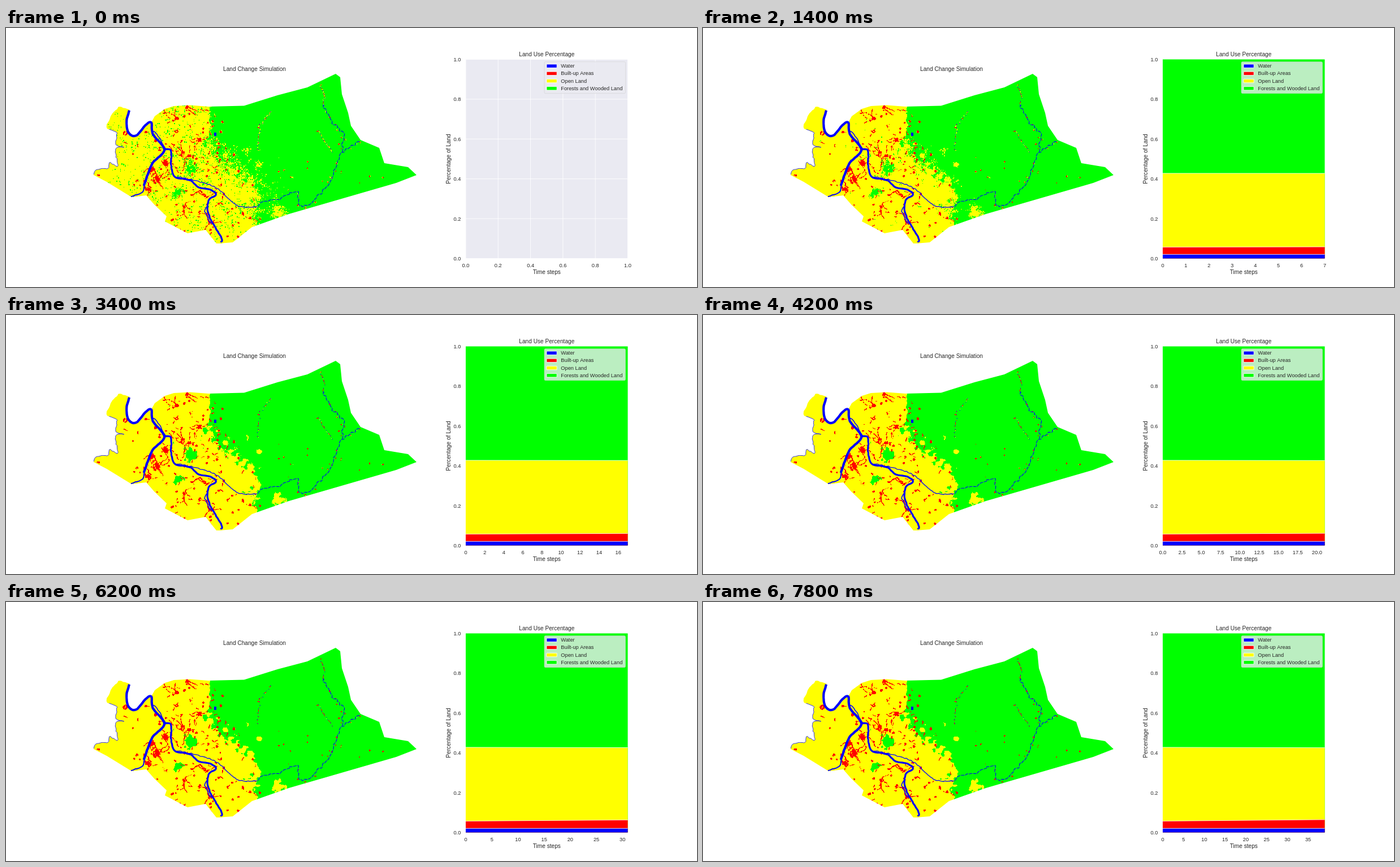
Recreate the animation shown at these times as an HTML page with a canvas. Size 1222 by 458 pixels, loop 8000 ms.

```html
<!DOCTYPE html>
<html lang="en">
<head>
<meta charset="utf-8">
<title>Land Change Simulation</title>
<style>
html, body { margin: 0; width: 100%; height: 100%; overflow: hidden; background: #fff; }
canvas { display: block; }
</style>
</head>
<body>
<canvas id="stage" width="1222" height="458"></canvas>
<script>
const STEP_MS = 200, STEPS = 40;
const WATER = '#0000ff', BUILT = '#ff0000', OPEN = '#ffff00', FOREST = '#00ff00';
const INK = '#262626', FONT = '"Liberation Sans", Arial, sans-serif';
const ctx = document.getElementById('stage').getContext('2d');

// ---------- helpers ----------
function hash(x, y, seed) {
  let h = Math.imul(x, 374761393) ^ Math.imul(y, 668265263) ^ Math.imul(seed, 1442695041);
  h = Math.imul(h ^ (h >>> 13), 1274126177);
  h = Math.imul(h ^ (h >>> 15), 2246822519);
  return ((h ^ (h >>> 16)) >>> 0) / 4294967296;
}
let draws = 0;
const rand = (a, b) => a + (b - a) * hash(draws++, 11, 5);
const clamp = (v, a, b) => Math.min(b, Math.max(a, v));
const ease = t => t * t * (3 - 2 * t);
const rise = (v, from, to) => ease(clamp((v - from) / (to - from), 0, 1));

// Value noise in -1..1
function noise(x, y, size, seed) {
  x /= size; y /= size;
  const i = Math.floor(x), j = Math.floor(y), u = ease(x - i), v = ease(y - j);
  const top = hash(i, j, seed) * (1 - u) + hash(i + 1, j, seed) * u;
  const low = hash(i, j + 1, seed) * (1 - u) + hash(i + 1, j + 1, seed) * u;
  return (top * (1 - v) + low * v) * 2 - 1;
}

// Smooth curve through key points, with a natural wobble
function trace(keys, wobble = 0) {
  const out = [], last = keys.length / 2 - 1;
  const key = (i, axis) => keys[2 * clamp(i, 0, last) + axis];
  const spline = (i, t, axis) => {
    const a = key(i - 1, axis), b = key(i, axis), c = key(i + 1, axis), d = key(i + 2, axis);
    return b + t * (c - a + t * (2 * a - 5 * b + 4 * c - d + t * (3 * (b - c) + d - a))) / 2;
  };
  for (let i = 0; i < last; i++) {
    const n = Math.ceil(Math.hypot(key(i + 1, 0) - key(i, 0), key(i + 1, 1) - key(i, 1)) / 2);
    for (let k = 0; k < n; k++) {
      const x = spline(i, k / n, 0), y = spline(i, k / n, 1);
      out.push(x + wobble * noise(x, y, 4, 7), y + wobble * noise(x, y, 4, 8));
    }
  }
  out.push(key(last, 0), key(last, 1));
  return out;
}
function path(points, p = new Path2D()) {
  for (let i = 0; i < points.length; i += 2) p.lineTo(points[i], points[i + 1]);
  return p;
}

// ---------- map geometry ----------
const X0 = 150, Y0 = 75, W = 580, H = 310;

const EAST = [257,167, 263,156, 281,143, 297,138, 325,136.5, 358,139, 421,137.5, 480,119, 533,105,
  583,81, 591,87, 594,117, 605,150, 610,173, 627,198, 660,212, 669,239, 711,246, 726,260,
  690,274, 500,329, 435,352, 401,379, 377,381];
const SOUTHWEST = [372,381, 353,357, 321,363, 281,342, 284,333, 262,312, 248,296, 222,299, 178,272, 155,260];
const COAST = trace([155,259, 160,250, 181,248, 184,238, 198,245, 196,232, 195,212, 208,211,
  194,206, 196,185, 178,177, 180,166, 191,147, 203,140, 219,146], 1.5);
const BANK = trace([219,146, 215,168, 218,183, 229,189, 247,171, 257,167]);
const outline = path([...EAST, ...SOUTHWEST, ...COAST, ...BANK]);

const RIVERS = [
  [4.2, .4, 218,146, 213,165, 217,186, 230,190, 247,172, 257,167, 260,188, 280,215, 260,238, 251,258, 244,279],
  [3.2, .6, 280,215, 292,217, 292,245, 300,264, 325,269, 341,282, 362,286, 371,295, 358,306, 359,332, 381,371, 380,379],
  [2, .8, 244,279, 242,290, 221,298],
  [1.5, .8, 259,182, 267,188, 284,216],
  [1.5, 1, 358,313, 352,324, 362,346],
  [1.3, 1.2, 300,263, 340,271, 374,284, 409,314, 440,316]
].map(([width, wobble, ...keys]) => ({ width, line: path(trace(keys, wobble)) }));

const STREAMS = [
  [440,316, 465,305, 484,303, 493,296, 505,291, 516,292, 520,315, 540,309, 558,289, 575,272, 583,247, 594,220, 626,201],
  [594,220, 596,186, 575,165, 560,136]
].map(keys => trace(keys, 2.6));
const BROOKS = [
  [560,136, 564,124, 557,100],
  [552,180, 560,195, 578,220],
  [468,149, 450,172, 444,215]
].map(keys => trace(keys, 3));

// x, y, radius
const TOWNS = [
  [211,186,6], [321,142,7], [302,160,5], [281,239,9], [258,251,9], [266,267,10], [252,285,9],
  [311,222,7], [343,198,6], [324,226,5], [354,298,6], [316,315,5], [361,345,5], [163,261,4]
];
// x, y, radius, weight: positive is wooded, negative is open
const PATCHES = [
  [290,162,7,1.2], [303,290,10,1.5], [325,248,13,1], [455,337,13,1.6],
  [425,215,8,-1.2], [447,240,7,-1.5], [428,290,14,-1], [482,326,14,-1.6]
];
const forestEdge = y => 360 + 75 * rise(y, 190, 290) + 1.3 * Math.max(0, y - 318);

// ---------- fixed fields ----------
function layer() {
  const c = document.createElement('canvas');
  c.width = W; c.height = H;
  const g = c.getContext('2d', { willReadFrequently: true });
  g.translate(-X0, -Y0);
  return g;
}
function blob(g, x, y, r) {
  const fill = g.createRadialGradient(x, y, 0, x, y, r);
  fill.addColorStop(0, '#000');
  fill.addColorStop(.5, 'rgba(0,0,0,.8)');
  fill.addColorStop(1, 'rgba(0,0,0,0)');
  g.fillStyle = fill;
  g.fillRect(x - r, y - r, 2 * r, 2 * r);
}
function road(g, x, y, length) {
  const points = [x, y];
  let angle = rand(0, 6.28);
  for (let d = 0; d < length; d += 2) {
    angle += rand(-.6, .6);
    points.push(x += 2 * Math.cos(angle), y += 2 * Math.sin(angle));
  }
  g.stroke(path(points));
}
function builtField() {
  const g = layer();
  g.lineWidth = 1.4;
  for (const [x, y, r] of TOWNS) {
    blob(g, x, y, r);
    if (x > 250) for (let i = 0; i < 4; i++) road(g, x, y, rand(10, 34));
  }
  for (let i = 0; i < 260; i++) {
    const x = rand(195, 450), y = rand(138, 372), r = rand(1.4, 3.6);
    if (x > forestEdge(y) + 25 || rand(0, 1) > rise(x, 190, 290)) continue;
    if (r < 2.5) road(g, x, y, 3 * r);
    else blob(g, x, y, r);
  }
  g.strokeStyle = 'rgba(0,0,0,.55)';
  g.lineWidth = 1.2;
  BROOKS.forEach(b => g.stroke(path(b)));
  for (const s of [...STREAMS, ...BROOKS])
    for (let i = 0; i < s.length; i += 2)
      if (rand(0, 1) < .1) blob(g, s[i] + rand(-5, 5), s[i + 1] + rand(-5, 5), rand(1, 2.3));
  for (let i = 0; i < 14; i++) blob(g, rand(470, 670), rand(225, 275), rand(1, 2.2));
  return g.getImageData(0, 0, W, H).data;
}
const built = builtField();
const wood = new Float32Array(W * H), speck = new Float32Array(W * H);
const town = new Float32Array(W * H), fringe = new Float32Array(W * H);

for (let j = 0; j < H; j++) {
  const y = j + Y0, edge = forestEdge(y), width = 3 + 40 * rise(y, 183, 215);
  for (let i = 0; i < W; i++) {
    const k = j * W + i, x = i + X0, alpha = built[k * 4 + 3] / 255;
    let v = clamp((x - edge) / width, -1, 2.4) - .12 * rise(270 - x, 0, 40);
    v += .35 * Math.exp(-(((x - 335) / 50) ** 2) - ((y - 235) / 50) ** 2);
    for (const [px, py, r, weight] of PATCHES)
      v += weight * Math.exp(-((x - px) ** 2 + (y - py) ** 2) / (r * r));
    wood[k] = v + .55 * noise(x, y, 9, 1) + .4 * noise(x, y, 4, 2);
    speck[k] = 1.25 * (hash(Math.floor(x / 1.5), Math.floor(y / 1.5), 3) * 2 - 1) ** 3;
    town[k] = alpha * (.85 + .65 * noise(x, y, 2.2, 4));
    fringe[k] = alpha > .12 ? hash(x, y, 6) : 1;
  }
}

// ---------- map ----------
const land = layer();
const picture = land.createImageData(W, H);

// Loose pixels settle into their surroundings while towns slowly grow
function paintLand(n) {
  const loose = Math.exp(-n / 9), limit = .54 - .0025 * n;
  const d = picture.data;
  for (let k = 0; k < W * H; k++) {
    const red = town[k] > limit;
    const green = !red && wood[k] + loose * speck[k] > 0 && fringe[k] > .5 * loose;
    d[k * 4] = green ? 0 : 255;
    d[k * 4 + 1] = red ? 0 : 255;
    d[k * 4 + 3] = 255;
  }
  land.putImageData(picture, 0, 0);
  ctx.save();
  ctx.clip(outline);
  ctx.drawImage(land.canvas, X0, Y0);
  ctx.restore();
}
function paintWater() {
  ctx.strokeStyle = ctx.fillStyle = WATER;
  ctx.lineJoin = 'round';
  for (const { width, line } of RIVERS) {
    ctx.lineWidth = width;
    ctx.stroke(line);
  }
  ctx.lineWidth = .8;
  ctx.stroke(path(COAST.slice(0, COAST.length * .7 & ~1)));
  ctx.lineWidth = 1.1;
  ctx.setLineDash([6, 1.5]);
  STREAMS.forEach(s => ctx.stroke(path(s)));
  ctx.lineWidth = .8;
  ctx.setLineDash([2, 5]);
  BROOKS.forEach(b => ctx.stroke(path(b)));
  ctx.setLineDash([]);
  ctx.fillRect(368, 185, 4, 6);
}

// ---------- chart ----------
const L = 813, R = 1099.5, T = 55.5, B = 407.5;
const yAt = v => B - v * (B - T);

function text(s, x, y, size, align = 'center') {
  ctx.font = size + 'px ' + FONT;
  ctx.textAlign = align;
  ctx.fillStyle = INK;
  ctx.fillText(s, x, y);
}
const line = (...points) => ctx.stroke(path(points));

// At most nine intervals of a round size
function tickStep(max) {
  const raw = max / 9, unit = 10 ** Math.floor(Math.log10(raw));
  return [1, 2, 2.5, 5, 10].map(m => m * unit).find(s => s >= raw - 1e-9);
}
function paintAxes(max) {
  ctx.fillStyle = '#eaeaf2';
  ctx.fillRect(L, T, R - L, B - T);
  ctx.strokeStyle = '#fff';
  ctx.lineWidth = .85;
  for (let i = 0; i <= 5; i++) {
    const y = yAt(i / 5);
    line(L, y, R, y);
    text((i / 5).toFixed(1), 804.3, y + 3.4, 9.27, 'right');
  }
  const step = tickStep(max);
  const digits = Number.isInteger(step) ? 0 : step === .25 ? 2 : 1;
  for (let i = 0; i * step <= max + 1e-9; i++) {
    const x = L + (R - L) * i * step / max;
    line(x, T, x, B);
    text((i * step).toFixed(digits), x, 422.7, 9.27);
  }
}
function paintAreas(n) {
  const g = n / (STEPS - 1);
  const bands = [[FOREST, 1, 0], [OPEN, .4276, -.0019], [BUILT, .057, .0073], [WATER, .0205, 0]];
  ctx.strokeStyle = '#fff';
  ctx.lineWidth = .85;
  for (const [color, start, change] of bands) {
    const a = yAt(start), b = yAt(start + change * g);
    ctx.fillStyle = color;
    ctx.fill(path([L, a, R, b, R, B, L, B]));
    if (start < 1) line(L, a, R, b);
  }
}
function paintLegend() {
  ctx.beginPath();
  ctx.roundRect(952, 59.7, 143.5, 56, 2);
  ctx.fillStyle = 'rgba(234,234,242,.8)';
  ctx.fill();
  ctx.strokeStyle = 'rgba(204,204,204,.6)';
  ctx.lineWidth = .85;
  ctx.stroke();
  const rows = [['Water', WATER], ['Built-up Areas', BUILT], ['Open Land', OPEN], ['Forests and Wooded Land', FOREST]];
  rows.forEach(([label, color], i) => {
    const y = 67.2 + 13.2 * i;
    ctx.fillStyle = color;
    ctx.strokeStyle = '#fff';
    ctx.fillRect(956, y - 3.2, 18.2, 6.4);
    ctx.strokeRect(956, y - 3.2, 18.2, 6.4);
    text(label, 981.3, y + 3, 9.27, 'left');
  });
}

function paint(n) {
  ctx.fillStyle = '#fff';
  ctx.fillRect(0, 0, 1222, 458);
  paintLand(n);
  paintWater();
  text('Land Change Simulation', 439.5, 75.7, 10.13);
  paintAxes(n || 1);
  if (n) paintAreas(n);
  paintLegend();
  text('Land Use Percentage', 956.3, 50, 10.13);
  text('Time steps', 956.3, 435, 10.13);
  ctx.save();
  ctx.translate(786, 231.5);
  ctx.rotate(-Math.PI / 2);
  text('Percentage of Land', 0, 0, 10.13);
  ctx.restore();
}

let shown = -1;
function tick() {
  const n = Math.floor(performance.now() / STEP_MS) % STEPS;
  if (n !== shown) paint(shown = n);
  requestAnimationFrame(tick);
}
tick();
</script>
</body>
</html>
```
